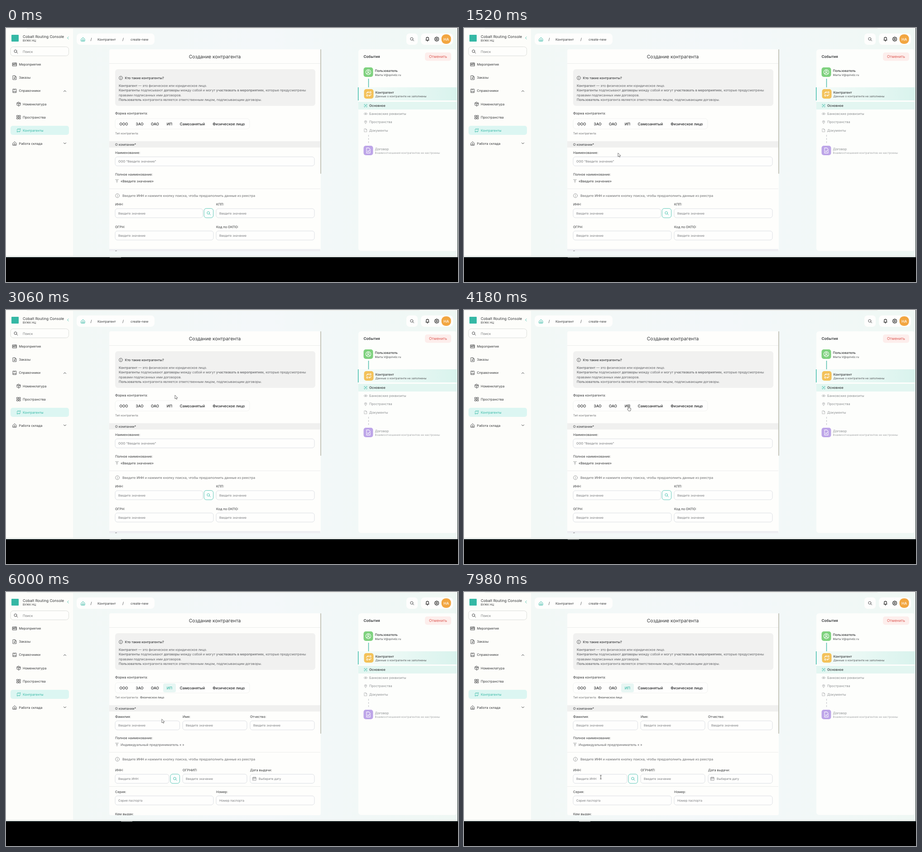
Recreate the animation shown at these times as an HTML page. Size 998x561 px, loop 8 s.

```html
<!DOCTYPE html>
<html lang="ru">
<head>
<meta charset="utf-8">
<title>Создание контрагента</title>
<style>
  html, body { margin: 0; width: 100%; height: 100%; overflow: hidden; background: #000; }
  svg { display: block; width: 998px; height: 561px; }
  text { font-family: Inter, "Noto Sans", sans-serif; text-rendering: geometricPrecision; white-space: pre; }
  .m { font-weight: 500; }
</style>
</head>
<body>
<svg id="stage" viewBox="0 0 998 561"></svg>
<script>
const INK = '#343638', GREY = '#77797b', PALE = '#97999b', TEAL = '#35b8a5';
const LOOP = 8000, SWITCH = 4550;

// Text is placed by its left edge and the middle of its capitals.
const text = (x, y, s, { size = 7.28, fill = INK, weight = 400, anchor = 'start' } = {}) =>
  `<text x="${x}" y="${y + size * .36}" font-size="${size}" fill="${fill}" font-weight="${weight}" text-anchor="${anchor}">${s}</text>`;
const rect = (x, y, w, h, fill, r = 0, stroke = 'none', sw = .8) =>
  `<rect x="${x}" y="${y}" width="${w}" height="${h}" rx="${r}" fill="${fill}" stroke="${stroke}" stroke-width="${sw}"/>`;
const line = (x1, y1, x2, y2, color, w = 1, extra = '') =>
  `<path d="M${x1} ${y1}L${x2} ${y2}" stroke="${color}" stroke-width="${w}" ${extra}/>`;

// Outline icons on a 24-unit grid, centred at (x, y).
const shapes = {
  search: 'M17 11a6.5 6.5 0 1 1-13 0a6.5 6.5 0 1 1 13 0M15.5 15.5L21 21',
  home: 'M3 11L12 3L21 11V21H3ZM9 21V15a3 3 0 0 1 6 0V21',
  bell: 'M5 17C7 15 6 12 6.5 9a5.5 5.5 0 0 1 11 0C18 12 17 15 19 17ZM10 20.5H14',
  gear: 'M12 2L15 4.5L19 4.5L20 9L22 12L20 15L19 19.5L15 19.5L12 22L9 19.5L5 19.5L4 15L2 12L4 9L5 4.5L9 4.5ZM15.5 12a3.5 3.5 0 1 1-7 0a3.5 3.5 0 1 1 7 0',
  card: 'M2 4H22V20H2ZM2 9H22M2 14H22M8 9V14M15 4V9',
  doc: 'M4 2H14L20 8V22H4ZM14 2V8H20M12 11V18M8.5 14.5H15.5',
  page: 'M4 2H14L20 8V22H4ZM14 2V8H20',
  book: 'M4 3H20V21H4ZM4 16H20M8 7H14',
  box: 'M12 2L21 7V17L12 22L3 17V7ZM3 7L12 12L21 7M12 12V22M7.5 4.5L16.5 9.5',
  grid: 'M3 3H10V10H3ZM14 3H21V10H14ZM3 14H10V21H3ZM14 14H21V21H14Z',
  agents: 'M9 18a3 3 0 1 1-6 0a3 3 0 1 1 6 0M21 6a3 3 0 1 1-6 0a3 3 0 1 1 6 0M3 11C3 6 7 5 11 6L9 3M11 6L8 8M21 13C21 18 17 19 13 18L15 21M13 18L16 16',
  user: 'M22 12a10 10 0 1 1-20 0a10 10 0 1 1 20 0M15.5 9.5a3.5 3.5 0 1 1-7 0a3.5 3.5 0 1 1 7 0M5.5 19C7 14 17 14 18.5 19',
  info: 'M22 12a10 10 0 1 1-20 0a10 10 0 1 1 20 0M12 11V17M12 7V8',
  frame: 'M3 8V3H8M16 3H21V8M21 16V21H16M8 21H3V16M8 9H16M8 15H14M11 12H16',
  coins: 'M14 12a6 6 0 1 1-12 0a6 6 0 1 1 12 0M22 12a6 6 0 1 1-12 0a6 6 0 1 1 12 0',
  pin: 'M12 22C6 16 4 13 4 10a8 8 0 0 1 16 0C20 13 18 16 12 22ZM15 10a3 3 0 1 1-6 0a3 3 0 1 1 6 0',
  title: 'M3 3H21M12 21V8M8 12L12 8L16 12',
  calendar: 'M3 5H21V21H3ZM3 10H21M8 2V7M16 2V7M7 15H10',
  check: 'M5 2H14L19 7V22H5ZM8.5 14L11.5 17L16 11',
  up: 'M5 15L12 8L19 15', down: 'M5 9L12 16L19 9', left: 'M15 5L8 12L15 19'
};
const icon = (name, x, y, size, color = INK, w = 1.9) =>
  `<path transform="translate(${x - size / 2} ${y - size / 2}) scale(${size / 24})" d="${shapes[name]}" fill="none" stroke="${color}" stroke-width="${w}" stroke-linejoin="round" stroke-linecap="round"/>`;

const field = (x, y, w, hint, indent = 7) =>
  rect(x, y, w, 20, '#fefefd', 5, '#d3d7de') + text(x + indent, y + 10.3, hint, { size: 6.76, fill: '#77797c' });
const labelled = (x, y, w, label, hint, gap = 9.3, indent) =>
  text(x, y, label) + field(x, y + gap, w, hint, indent);
const findButton = (x, y) =>
  rect(x, y, 20.5, 20.5, '#fcfffe', 5, TEAL) + icon('search', x + 10.2, y + 10.2, 10.5, TEAL, 2);
const hintLine = y => icon('info', 246, y, 10.5, GREY, 1.6) +
  text(257, y, 'Введите <tspan class="m">ИНН</tspan> и нажмите кнопку поиска, чтобы предзаполнить данные из реестра', { fill: '#68696b' });
const rule = y => line(228, y, 694, y, '#ebeceb');
const VALUE = 'Введите значение';

const sidebar = () => {
  const items = [['card', 80.5, 'Мероприятия', 0], ['doc', 109.7, 'Заказы', 0], ['book', 138.8, 'Справочники', 0],
    ['box', 168, 'Номенклатура', 1], ['grid', 197, 'Пространства', 1], ['agents', 226, 'Контрагенты', 1], ['home', 255, 'Работа склада', 0]];
  return rect(0, 2, 148, 501.5, '#fdfdfa') + rect(12, 15, 16, 15, TEAL, 1) +
    text(37, 18.6, 'Cobalt Routing Console', { size: 8.2 }) + text(37, 28.2, 'ВУЖК НЦ', { size: 6.24 }) +
    icon('left', 137, 22, 9, TEAL, 2.2) +
    rect(10, 41.5, 128.5, 20, '#fefefc', 6, '#d3d6d2') + icon('search', 21.7, 51.7, 11) + text(37, 52, 'Поиск', { fill: GREY }) +
    rect(10, 216, 129, 20, '#dcf6f2', 5) +
    items.map(([name, y, label, nested]) => {
      const color = name === 'agents' ? TEAL : INK;
      return icon(name, nested ? 28 : 19, y, 10.5, color) + text(nested ? 37 : 28.5, y, label, { fill: color });
    }).join('') +
    icon('up', 130, 139.5, 8.5, INK, 2.6) + icon('down', 130, 254.5, 8.5, INK, 2.6);
};

const topBar = () =>
  rect(156, 12, 172, 25, '#fefefd', 8) + icon('home', 170, 25, 10.5, TEAL, 2.2) +
  text(186.5, 25, '/', { size: 8.3 }) + text(202, 25, 'Контрагент') + text(257, 25, '/', { size: 8.3 }) + text(275, 25, 'create-new') +
  rect(884, 12, 25, 25, '#fefefd', 7) + icon('search', 896.5, 24.5, 11) +
  rect(916, 12, 71, 25, '#fefefd', 8) + icon('bell', 930.5, 24.5, 11.5, '#222', 2.4) + icon('gear', 951, 24.5, 11.5, '#222', 2.4) +
  rect(961.5, 14, 21, 21, '#f2a641', 9) + text(972, 24.6, 'НА', { size: 8.3, fill: '#fff', weight: 500, anchor: 'middle' });

const events = () => {
  const tile = (x, y, fill, name) => rect(x, y, 21, 21, fill, 5) + icon(name, x + 10.5, y + 10.5, 13.5, '#fff', 1.9);
  const steps = [['coins', 189.5, 'Банковские реквизиты'], ['pin', 207.8, 'Пространства'], ['page', 226, 'Документы']];
  return rect(778, 47, 218, 445.5, '#fdfefc', 6) +
    text(789.5, 63, 'События', { size: 8.2, weight: 600 }) +
    rect(925, 54, 58, 18.5, '#fdeeec', 5) + text(954, 63.2, 'Отменить', { size: 8.3, fill: '#dc5650', anchor: 'middle' }) +
    tile(789.5, 87, '#7ed17e', 'user') +
    text(814.5, 94, 'Пользователь', { weight: 500 }) + text(814.5, 103.3, 'Marta.V@qolvdz.ru', { size: 6.24, weight: 500, fill: '#606365' }) +
    line(800.5, 112, 800.5, 131, '#50bdad', 1.5) +
    rect(777, 131, 219, 29, 'url(#row)') + rect(777, 131, 1.4, 29, TEAL) +
    tile(790.5, 135, '#f3c25a', 'agents') +
    text(815.5, 142, 'Контрагент', { weight: 500 }) + text(815.5, 151, 'Данные о контрагенте не заполнены', { size: 6.24, fill: '#505355' }) +
    rect(778, 163, 218, 17, '#e3f6f1') + icon('frame', 794, 171.5, 8, TEAL, 2) + text(802, 171.5, 'Основное', { weight: 500 }) +
    steps.map(([name, y, label]) => icon(name, 794, y, 8, PALE, 1.9) + text(802, y, label, { fill: '#8b8e90' })).join('') +
    line(800.5, 236, 800.5, 256, '#c9cacd', 1.3, 'stroke-dasharray="4 3"') +
    tile(789.5, 260, '#bda5e8', 'check') +
    text(814.5, 267.3, 'Договор', { fill: '#8b8e90' }) +
    text(814.5, 275.8, 'Взаимоотношения контрагентов не настроены', { size: 6.24, fill: '#a2a4a6' });
};

const formHead = () => {
  const paragraph = ['<tspan class="m">Контрагент</tspan> — это физическое или юридическое лицо.',
    '<tspan class="m">Контрагенты</tspan> подписывают <tspan class="m">договоры</tspan> между собой и могут <tspan class="m">участвовать в мероприятиях</tspan>, которые предусмотрены',
    'правами подписанных ими договоров.',
    '<tspan class="m">Пользователь</tspan> контрагента является ответственным лицом, подписывающим договоры.'];
  const forms = [[250.5, 'ООО'], [286.5, 'ЗАО'], [320, 'ОАО'], [354.8, 'ИП'], [383.8, 'Самозанятый'], [456.3, 'Физическое лицо']];
  return rect(228, 47, 467, 446, '#fefefc', 4) +
    text(461, 63, 'Создание контрагента', { size: 10.4, anchor: 'middle' }) + rule(78.5) +
    rect(241, 91, 442, 81, '#f1f1f0', 6) + icon('info', 253.5, 110.3, 9.5, INK, 1.9) +
    text(262.5, 110.3, 'Кто такие контрагенты?', { weight: 500 }) +
    paragraph.map((s, i) => text(249, 127.2 + i * 10.5, s, { fill: '#606265' })).join('') +
    text(241, 188.7, 'Форма контрагента:') +
    rect(241, 200, 297, 23, '#fefefd', 6, '#eeefed') +
    `<g id="picked">${rect(347, 202, 28, 19.5, '#e7f6f3', 4)}</g>` +
    forms.map(([x, s]) => s === 'ИП' ? `<g id="choice">${formName(x, s)}</g>` : formName(x, s)).join('') +
    text(241, 233.2, 'Тип контрагента:', { size: 6.24, fill: '#68696b' }) +
    rect(228, 250, 466, 14, '#f0f0ef') + text(241, 257.2, 'О компании*');
};
const formName = (x, s, fill = '#202224') => text(x, 211.7, s, { size: 8.2, weight: 500, fill });

const companyForm = () =>
  labelled(241, 275.3, 440, 'Наименование:', 'ООО "Введите значение"') +
  text(241, 323.3, 'Полное наименование:') + icon('title', 245, 338.2, 9, GREY) + text(253, 338.2, '«Введите значение»') +
  rule(355) + hintLine(370.3) +
  labelled(241, 389.7, 193.5, 'ИНН:', VALUE) + findButton(437.2, 398.6) + labelled(464, 389.7, 217, 'КПП:', VALUE) +
  labelled(241, 439, 217, 'ОГРН:', VALUE) + labelled(464, 439, 217, 'Код по ОКПО:', VALUE) +
  rect(228, 488, 466, 6, '#eeeff2') + text(241, 494.5, 'Банковские реквизиты') +
  rect(694, 47, 2, 275, '#c5c6ba', 1) + rect(229, 506, 25, 2, '#596061');

const personForm = () =>
  formName(354.8, 'ИП', TEAL) +
  text(296, 233.2, 'Физическое лицо', { size: 6.24 }) +
  labelled(241, 275.3, 142.5, 'Фамилия:', VALUE) + labelled(390, 275.3, 142, 'Имя:', VALUE) + labelled(539, 275.3, 142, 'Отчество:', VALUE) +
  text(241, 322.3, 'Полное наименование:') + icon('title', 245, 337.2, 9, GREY) +
  text(253, 337.2, 'Индивидуальный предприниматель « »', { fill: '#606265' }) +
  rule(354) + hintLine(369.4) +
  labelled(241, 393.3, 119, 'ИНН:', 'Введите ИНН') + findButton(363, 402.2) +
  labelled(390, 393, 142, 'ОГРНИП:', VALUE) +
  labelled(539, 393.2, 142, 'Дата выдачи:', 'Выберите дату', 9.3, 19) + icon('calendar', 548.5, 412.3, 9.5, GREY) +
  rule(429.5) +
  labelled(241, 441, 217, 'Серия:', 'Серия паспорта') + labelled(464, 441, 217, 'Номер:', 'Номер паспорта') +
  text(241, 490.6, 'Кем выдан:') +
  rect(694, 47, 2, 266, '#c5c6ba', 1) + rect(254, 506, 25, 2, '#596061');

const cursorShapes = {
  arrow: '<path d="M0 0V8.3L2 6.5L3.3 9.3L4.7 8.7L3.5 6H6Z" fill="#fff" stroke="#555" stroke-width=".8"/>',
  hand: '<path d="M-.8 7V.8Q0-.3 .8 .8V4.5L4.5 5.5Q5 6 4.8 8.5L3.8 11.5H-.2L-2.8 7.5Q-2.5 6-.8 7Z" fill="#fff" stroke="#444" stroke-width=".8"/>',
  beam: '<path d="M-1.8-4H1.8M0-4V4M-1.8 4H1.8" fill="none" stroke="#444" stroke-width=".9"/>'
};

const stage = document.getElementById('stage');
stage.innerHTML = `<defs>
  <linearGradient id="page"><stop stop-color="#f2f8f6"/><stop offset=".5" stop-color="#f4f8fa"/><stop offset="1" stop-color="#eff8f4"/></linearGradient>
  <linearGradient id="row"><stop stop-color="#f6fcfa"/><stop offset="1" stop-color="#d9f3ed"/></linearGradient>
  <clipPath id="card"><path d="M228 47H697V493H228ZM220 504H290V509H220Z"/></clipPath></defs>` +
  rect(0, 0, 998, 506, '#f8faf7') + rect(148, 2, 849, 501.5, 'url(#page)') + line(46, .8, 913, .8, '#e5e6e0', .8) +
  sidebar() + topBar() + events() +
  line(0, 503.7, 998, 503.7, '#dfe3e0', .8) + rect(0, 506, 998, 2, '#101a1b') + rect(997, 0, 1, 506, '#1c2424') +
  `<g clip-path="url(#card)">${formHead()}<g id="company">${companyForm()}</g><g id="person">${personForm()}</g></g>
  <g id="cursor">${Object.entries(cursorShapes).map(([id, s]) => `<g id="${id}">${s}</g>`).join('')}</g>`;

// Pointer stops: time, x, y.
const stops = [[1000, 262, 500], [1520, 340, 276], [1800, 340, 276], [3060, 373, 188], [3300, 373, 188],
  [3950, 363.5, 211.5], [5350, 363.5, 211.5], [5860, 346, 275], [6840, 310, 376], [7600, 302, 409], [8000, 302, 409]];

function pointerAt(t) {
  const i = Math.max(1, stops.findIndex(s => s[0] >= t));
  const [t0, x0, y0] = stops[i - 1], [t1, x1, y1] = stops[i];
  const k = Math.max(0, (t - t0) / (t1 - t0)), e = k * k * (3 - 2 * k);
  return [x0 + (x1 - x0) * e, y0 + (y1 - y0) * e];
}

const show = (id, on) => document.getElementById(id).setAttribute('visibility', on ? 'visible' : 'hidden');

function draw(now) {
  const t = now % LOOP, person = t >= SWITCH, [x, y] = pointerAt(t);
  const within = (top, bottom) => y >= top && y <= bottom;
  const overField = within(285, 305) || (person ? within(402, 422) : within(399, 419) || within(448, 468));
  const shape = within(201, 222) ? 'hand' : overField ? 'beam' : 'arrow';
  show('company', !person);
  show('choice', !person);
  show('person', person);
  show('picked', person);
  for (const id in cursorShapes) show(id, t >= stops[0][0] && id === shape);
  document.getElementById('cursor').setAttribute('transform', `translate(${x} ${y})`);
  requestAnimationFrame(draw);
}
draw(performance.now());
</script>
</body>
</html>
```
